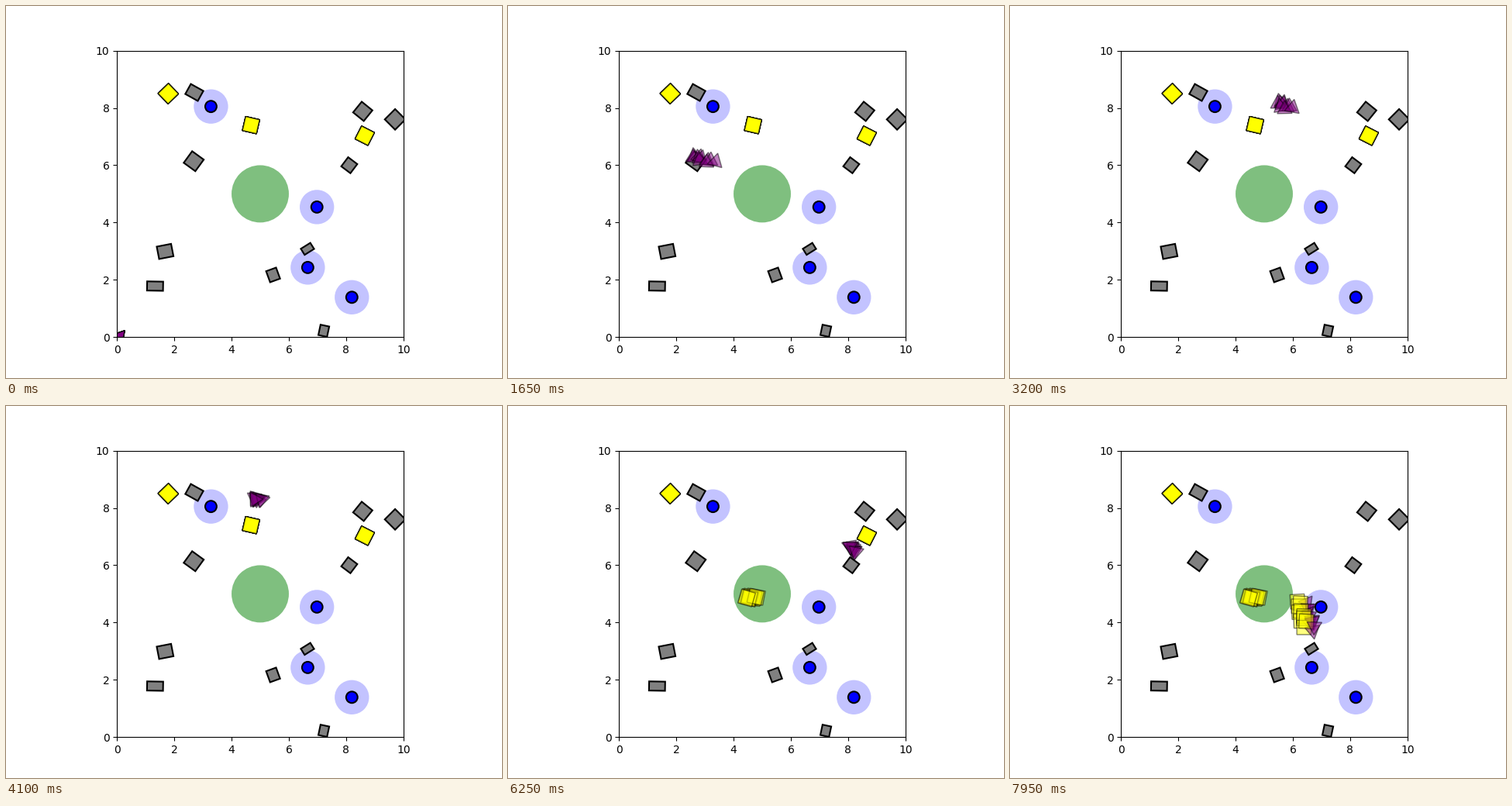
These frames come from a looping animation (640x480 px, 8 s). A matplotlib script:

```python
import numpy as np
import matplotlib.pyplot as plt
from matplotlib.animation import FuncAnimation
from matplotlib.patches import Circle, Polygon, Rectangle

FRAMES, STEP = 160, 50
COUNT, ALPHA = 10, 0.5      # sampled robots, opacity of each
BOX, REACH = 0.5, 0.33      # box side, distance at which a robot holds one
ARRIVE = 99                 # first delivery, followed by one idle step

# x, y, width, height, angle
OBSTACLES = [
    (2.70, 8.54, .50, .40, -29), (2.68, 6.14, .50, .50, -36),
    (8.58, 7.88, .48, .48, -39), (9.71, 7.60, .51, .51, -45),
    (8.11, 6.00, .40, .40, -37), (6.65, 3.08, .39, .25, 32),
    (1.68, 2.99, .51, .44, 11), (1.33, 1.78, .56, .32, -1),
    (5.45, 2.17, .37, .41, 20), (7.22, 0.22, .31, .37, -12),
]
PEOPLE = [(3.28, 8.05), (6.98, 4.54), (6.66, 2.43), (8.20, 1.39)]
BOXES = [(1.79, 8.50, 44), (4.68, 7.40, -13), (8.65, 7.03, -27)]
CARRY = {1: (85, ARRIVE, 0), 2: (128, FRAMES, 27)}   # pick, drop, turn

# way points (time, x, y): one leg ends with a delivery, the next begins there
LEGS = [np.array(leg) for leg in (
    [(0, .07, 0), (22, 2.9, 3.24), (37, 3.1, 6.85), (44, 3.93, 6.82), (53, 5.2, 6.8),
     (64, 5.7, 8.1), (74, 5.25, 9), (82, 4.88, 8.31), (ARRIVE, 4.64, 5.19)],
    [(ARRIVE, 4.64, 5.19), (112, 6.3, 5.75), (124, 8.17, 6.58), (128, 8.5, 6.8),
     (134, 8.85, 6.1), (148, 7.75, 3.8), (158, 6.6, 4.2)],
)]

rng = np.random.default_rng(4)
NOISE = np.clip(rng.normal(size=(COUNT, 3)), -1.5, 1.5)
RANK = np.linspace(-1, 1, COUNT)


def unit(angle):
    return np.array([np.cos(angle), np.sin(angle)])


def hermite(leg, t):
    times, pts = leg[:, 0], leg[:, 1:]
    slope = np.gradient(pts, times, axis=0)
    i = int(np.clip(np.searchsorted(times, t, side="right") - 1, 0, len(times) - 2))
    h = times[i + 1] - times[i]
    u = (t - times[i]) / h
    s = u * u * (3 - 2 * u)
    return (pts[i] * (1 - s) + pts[i + 1] * s
            + h * u * (1 - u) * ((1 - u) * slope[i] - u * slope[i + 1]))


def course(t):
    """Position on the route and the heading along it."""
    leg = LEGS[int(t > ARRIVE)]
    pos = hermite(leg, t)
    lo, hi = max(t - .3, leg[0, 0]), min(t + .3, leg[-1, 0])
    dx, dy = hermite(leg, hi) - hermite(leg, lo)
    return pos, np.arctan2(dy, dx)


def swarm(t):
    """Poses of all robots: the group stretches and gathers in a slow cycle."""
    pos, heading = course(t)
    phase = (t - 44) / 114
    stretch = 0.45 * np.cos(np.pi * phase)**4 * unit(np.radians(-22 - 50 * phase))
    side = 0.1 * unit(heading + np.pi / 2)
    along = 0.03 * unit(heading)
    grow = min(t / 20, 1)
    return [(pos + grow * (r * stretch + n[0] * side + n[1] * along),
             heading + grow * np.radians(8) * n[2])
            for r, n in zip(RANK, NOISE)]


def held_boxes(k, robots, home, pick, turn):
    """Boxes slide into the grip, then ride in front of their robots."""
    x, y, angle = home
    grip = np.clip((k - pick) / 4, 0, 1)
    turned = angle + turn * np.clip((k - pick) / 24, 0, 1)
    for (pos, heading), n in zip(robots, NOISE):
        front = pos + REACH * unit(heading)
        yield (1 - grip) * np.array([x, y]) + grip * front, turned + 2 * grip * n[2]


def triangle(pos, heading, r=0.3):
    return [pos + r * unit(heading + i * 2 * np.pi / 3) for i in range(3)]


def add_rect(x, y, w, h, angle, color, **style):
    return ax.add_patch(Rectangle((x - w/2, y - h/2), w, h, angle=angle,
                                  rotation_point="center", fc=color, ec="black", **style))


fig, ax = plt.subplots(figsize=(6.4, 4.8), dpi=100)
ax.set(xlim=(0, 10), ylim=(0, 10), aspect="equal")

ax.add_patch(Circle((5, 5), 1, fc="green", ec="none", alpha=0.5))
for p in PEOPLE:
    ax.add_patch(Circle(p, 0.6, fc="blue", ec="none", alpha=0.235))
    ax.add_patch(Circle(p, 0.2, fc="blue", ec="black", lw=1.5))
for shape in OBSTACLES:
    add_rect(*shape, "gray", lw=1.5)

samples = []
for _ in range(COUNT):
    crates = [add_rect(x, y, BOX, BOX, a, "yellow", alpha=ALPHA) for x, y, a in BOXES]
    robot = ax.add_patch(Polygon(triangle(np.zeros(2), 0), fc="purple", ec="black", alpha=ALPHA))
    samples.append((crates, robot))


def update(k):
    t = k - (k > ARRIVE)
    robots = swarm(t)
    for (_, robot), pose in zip(samples, robots):
        robot.set_xy(triangle(*pose))
    for b, (pick, drop, turn) in CARRY.items():
        now = min(t, drop)
        carriers = swarm(now)
        for (crates, _), (pos, angle) in zip(samples, held_boxes(now, carriers, BOXES[b], pick, turn)):
            crates[b].set_xy(pos - BOX / 2)
            crates[b].set_angle(angle)
    return []


anim = FuncAnimation(fig, update, frames=FRAMES, interval=STEP, repeat=True, repeat_delay=0)
plt.show()
```
